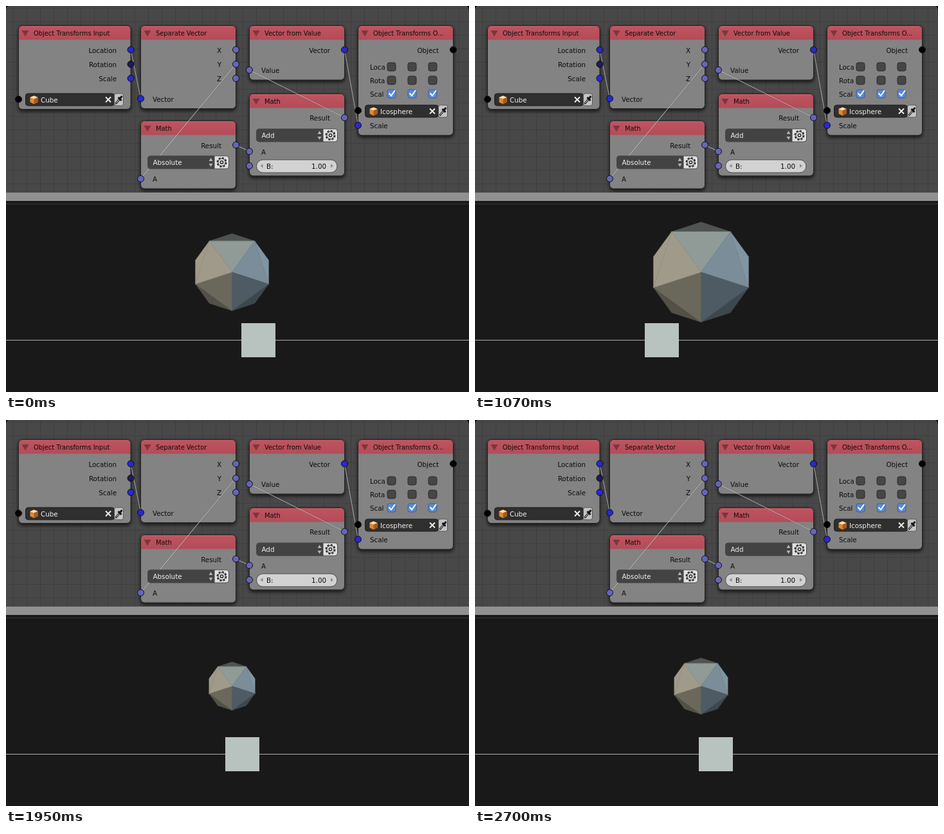
Recreate the animation shown at these times as an HTML page. Size 720 by 600 pixels, loop 2730 ms.

```html
<!DOCTYPE html>
<html lang="en">
<head>
<meta charset="utf-8">
<title>Node driven scale</title>
<style>
  html, body { margin: 0; width: 100%; height: 100%; overflow: hidden; background: #191919; }
  svg { display: block; width: 720px; height: 600px; }
  text { font: 10.3px "DejaVu Sans", sans-serif; fill: #0b0b0b; }
  text.title { font-size: 9.9px; }
  text.light { fill: #f2f2f2; }
</style>
</head>
<body>
<svg id="stage" viewBox="0 0 720 600" xmlns="http://www.w3.org/2000/svg">
  <defs>
    <pattern id="grid" width="21" height="21" x="11" y="3" patternUnits="userSpaceOnUse">
      <path d="M0 .5H21M.5 0V21" stroke="#3f3f3f"/>
    </pattern>
    <linearGradient id="head" x2="0" y2="1">
      <stop stop-color="#c4606a"/><stop offset=".15" stop-color="#bd535f"/><stop offset="1" stop-color="#b34c58"/>
    </linearGradient>
    <filter id="blur" x="-10%" y="-10%" width="120%" height="125%"><feGaussianBlur stdDeviation="2.5"/></filter>
  </defs>
  <rect width="720" height="290" fill="#484848"/>
  <rect width="720" height="290" fill="url(#grid)"/>
  <path d="M0 0H5Q0 0 0 6ZM720 0H715Q720 0 720 9Z" fill="#000"/>
  <g id="editor"></g>
  <rect y="290" width="720" height="13" fill="#919191"/>
  <rect y="303" width="720" height="297" fill="#191919"/>
  <rect y="307" width="720" height="1" fill="#353535"/>
  <rect y="519" width="720" height="1" fill="#a9b1a9"/>
  <g id="ball"></g>
  <rect id="cube" y="493" width="53" height="53" fill="#b8c2be"/>
</svg>
<script>
const NS = 'http://www.w3.org/2000/svg';
const editor = document.getElementById('editor');
const ball = document.getElementById('ball');
const cube = document.getElementById('cube');

function add(tag, attrs, parent = editor) {
  const el = document.createElementNS(NS, tag);
  for (const k in attrs) el.setAttribute(k, attrs[k]);
  return parent.appendChild(el);
}
const path = (d, attrs) => add('path', { d, fill: 'none', ...attrs });
const box = (x, y, width, height, rx, fill, stroke = '#2b2b2b') =>
  add('rect', { x, y, width, height, rx, fill, stroke });

function label(str, x, y, cls = '', anchor = 'start') {
  add('text', { x, y, class: cls, 'text-anchor': anchor }).textContent = str;
}
const rightLabel = (str, x, y) => label(str, x, y, '', 'end');

function node(title, x, y, w, h) {
  add('rect', { x: x - 1, y: y + 1, width: w + 2, height: h + 3, rx: 7, fill: '#000', opacity: .6, filter: 'url(#blur)' });
  box(x, y, w, h, 6, '#838383', 'none');
  path(`M${x} ${y + 22}v-16q0 -6 6 -6h${w - 12}q6 0 6 6v16z`, { fill: 'url(#head)' });
  box(x, y, w, h, 6, 'none', '#242424');
  path(`M${x + 5} ${y + 7.5}h11l-5.5 9.5z`, { fill: '#7c363f' });
  label(title, x + 23.5, y + 15.5, 'title');
}

function socket(cx, cy, fill) {
  add('circle', { cx, cy, r: 5, fill, stroke: '#0c0c0c', 'stroke-width': 1 });
}

function objectField(name, x, y, w) {
  box(x, y, w, 19, 4, '#2f2f2f', '#1d1d1d');
  path(`M${x + 7} ${y + 6}l6 -2.5 6 2.5v7.5l-6 3 -6 -3z`, { fill: '#e08a35' });
  path(`M${x + 7} ${y + 6}l6 -2.5 6 2.5 -6 2.5z`, { fill: '#ffe0ae' });
  path(`M${x + 13} ${y + 8.5}l6 -2.5v7.5l-6 3z`, { fill: '#a95a1c' });
  label(name, x + 23.5, y + 13.5, 'light');
  const cx = x + w - 9.5, cy = y + 9.5;
  path(`M${cx - 4} ${cy - 4}l8 8m0 -8l-8 8`, { stroke: '#f4f4f4', 'stroke-width': 1.8 });
  box(x + w, y, 14, 19, 3, '#c4c4c4', '#555');
  path(`M${x + w + 2} ${y + 16}l6 -7`, { stroke: '#222', 'stroke-width': 3 });
  path(`M${x + w + 2.7} ${y + 15}l5.5 -6`, { stroke: '#eee' });
  path(`M${x + w + 6} ${y + 6}l5 5M${x + w + 8.5} ${y + 8}l3.5 -4`, { stroke: '#151515', 'stroke-width': 3 });
}

function dropdown(str, x, y) {
  box(x, y, 126, 20, 4, '#e0e0e0', '#4a4a4a');
  path(`M${x + 104} ${y}v20h-100q-4 0 -4 -4v-12q0 -4 4 -4z`, { fill: '#434343' });
  label(str, x + 8, y + 14, 'light');
  path(`M${x + 95} ${y + 8}l3 -5 3 5zM${x + 95} ${y + 12}l3 5 3 -5z`, { fill: '#b5b5b5' });
  const c = { cx: x + 115, cy: y + 10, fill: 'none', stroke: '#2c2c2c' };
  add('circle', { ...c, r: 7, 'stroke-width': 2, 'stroke-dasharray': '3.3 2.2' });
  add('circle', { ...c, r: 5.6 });
  add('circle', { ...c, r: 2.2, 'stroke-width': 1.5 });
}

function checkbox(cx, cy, on) {
  box(cx - 6.5, cy - 6.5, 13, 13, 3, on ? '#568bd8' : '#464646', on ? '#3c5e94' : '#2a2a2a');
  if (on) path(`M${cx - 4} ${cy - 1}l3.5 4 6 -8.5`, { stroke: '#fff', 'stroke-width': 2 });
}

const BLUE = '#2828cf', LILAC = '#6664bb', DARK = '#211a58', BLACK = '#000';

function buildEditor() {
  node('Object Transforms Input', 19.5, 30.5, 174.5, 130);
  node('Separate Vector', 209.5, 30.5, 148, 129);
  node('Vector from Value', 378.5, 30.5, 148, 84.5);
  node('Object Transforms O...', 547.5, 30.5, 148, 170.5);
  node('Math', 209.5, 178.5, 148, 105.5);
  node('Math', 378.5, 136.5, 148, 127.5);

  const links = 'M194 68L209.5 144M357.5 90L209.5 268.5M357.5 216L378.5 226M526.5 173.5L378.5 99.5M526.5 68L547.5 185.5';
  path(links, { stroke: '#333', 'stroke-width': 2.4, opacity: .2 });
  path(links, { stroke: '#dcdcdc', 'stroke-width': 1.1, opacity: .65 });

  ['Location', 'Rotation', 'Scale'].forEach((s, i) => rightLabel(s, 172, 73 + 22 * i));
  ['X', 'Y', 'Z'].forEach((s, i) => rightLabel(s, 335, 73 + 22 * i));
  rightLabel('Vector', 504, 73);
  rightLabel('Object', 673, 73);
  rightLabel('Result', 335, 221);
  rightLabel('Result', 504, 178);
  label('Vector', 228, 149);
  label('Value', 397, 104);
  label('A', 228, 273);
  label('A', 397, 231);
  label('Scale', 566, 190);

  ['Loca', 'Rota', 'Scal'].forEach((s, row) => {
    label(s, 566, 99 + 21 * row);
    for (const cx of [599.5, 631.5, 663.5]) checkbox(cx, 94.5 + 21 * row, row === 2);
  });

  objectField('Cube', 30.5, 136, 138);
  objectField('Icosphere', 558.5, 154, 114);
  dropdown('Absolute', 220.5, 233);
  dropdown('Add', 389.5, 191);

  box(389.5, 239, 125.5, 20, 10, '#d2d2d2', '#4a4a4a');
  path('M399.5 245.5v6l-4 -3zM505 245.5v6l4 -3z', { fill: '#8c8c8c' });
  label('B:', 405, 253);
  rightLabel('1.00', 498, 253);

  for (const [x, y, c] of [
    [194, 68, BLUE], [194, 90.5, DARK], [194, 112.5, BLUE], [19.5, 145, BLACK],
    [357.5, 68, LILAC], [357.5, 90.5, LILAC], [357.5, 112.5, LILAC], [209.5, 144, BLUE],
    [526.5, 68, BLUE], [378.5, 99.5, LILAC],
    [695.5, 68, BLACK], [547.5, 162.5, BLACK], [547.5, 185.5, BLUE],
    [357.5, 216, LILAC], [209.5, 268.5, LILAC],
    [526.5, 173.5, LILAC], [378.5, 226, LILAC], [378.5, 248.5, LILAC]
  ]) socket(x, y, c);
}

// Unit icosphere seen along a vertex: five inner and five rim faces.
function buildBall() {
  const inner = ['#909a96', '#7b8d99', '#4e5b64', '#6a675b', '#a09a8a'];
  const rim = ['#4f5352', '#8095a3', '#3d484e', '#545047', '#a19a89'];
  const pt = deg => {
    const a = deg * Math.PI / 180;
    return `${Math.sin(a).toFixed(4)},${(-Math.cos(a)).toFixed(4)}`;
  };
  const face = (points, fill) =>
    add('polygon', { points, fill, stroke: fill, 'stroke-width': .4, 'vector-effect': 'non-scaling-stroke' }, ball);
  for (let i = 0; i < 5; i++) {
    const a = 72 * i;
    face([pt(a - 36), pt(a), pt(a + 36)].join(' '), rim[i]);
    face(['0,0', pt(a - 36), pt(a + 36)].join(' '), inner[i]);
  }
}

// Cube centre over time: [ms, x]
const LOOP = 2730, STEP = 43, MID = 351.5;
const keys = [
  [0, 392.5], [50, 396], [90, 398.5], [230, 398.5], [270, 394], [430, 344.5],
  [780, 269.5], [830, 267.5], [920, 267.5], [960, 271], [1300, 376.5], [1350, 386],
  [1390, 394], [1600, 420.5], [1700, 420.5], [1740, 416], [2230, 270.5],
  [2270, 265.5], [2410, 265.5], [2450, 269], [2700, 374.5], [LOOP, 392.5]
];
const slopes = keys.slice(1).map((k, i) => (k[1] - keys[i][1]) / (k[0] - keys[i][0]));
const tangents = keys.map((_, i) => {
  const a = slopes[i - 1] ?? slopes[i], b = slopes[i] ?? a;
  return a * b > 0 ? 2 * a * b / (a + b) : 0;
});

// Monotone cubic through the keys, sampled in even steps within each span.
function cubeX(t) {
  let i = keys.length - 2;
  while (keys[i][0] > t) i--;
  const [t0, x0] = keys[i], [t1, x1] = keys[i + 1];
  const span = t1 - t0, n = Math.max(1, Math.round(span / STEP));
  const u = Math.floor((t - t0) / span * n) / n, v = 1 - u;
  return v * v * (1 + 2 * u) * x0 + u * u * (3 - 2 * u) * x1
    + u * v * span * (v * tangents[i] - u * tangents[i + 1]);
}

function render(t) {
  const left = Math.round(cubeX(t) - 26.5);
  const radius = 23.3 + .894 * Math.abs(left + 26.5 - MID);
  cube.setAttribute('x', left);
  ball.setAttribute('transform', `translate(${MID} 413.7) scale(${radius})`);
}

buildEditor();
buildBall();
render(0);
const start = performance.now();
(function tick() {
  render((performance.now() - start) % LOOP);
  requestAnimationFrame(tick);
})();
</script>
</body>
</html>
```
